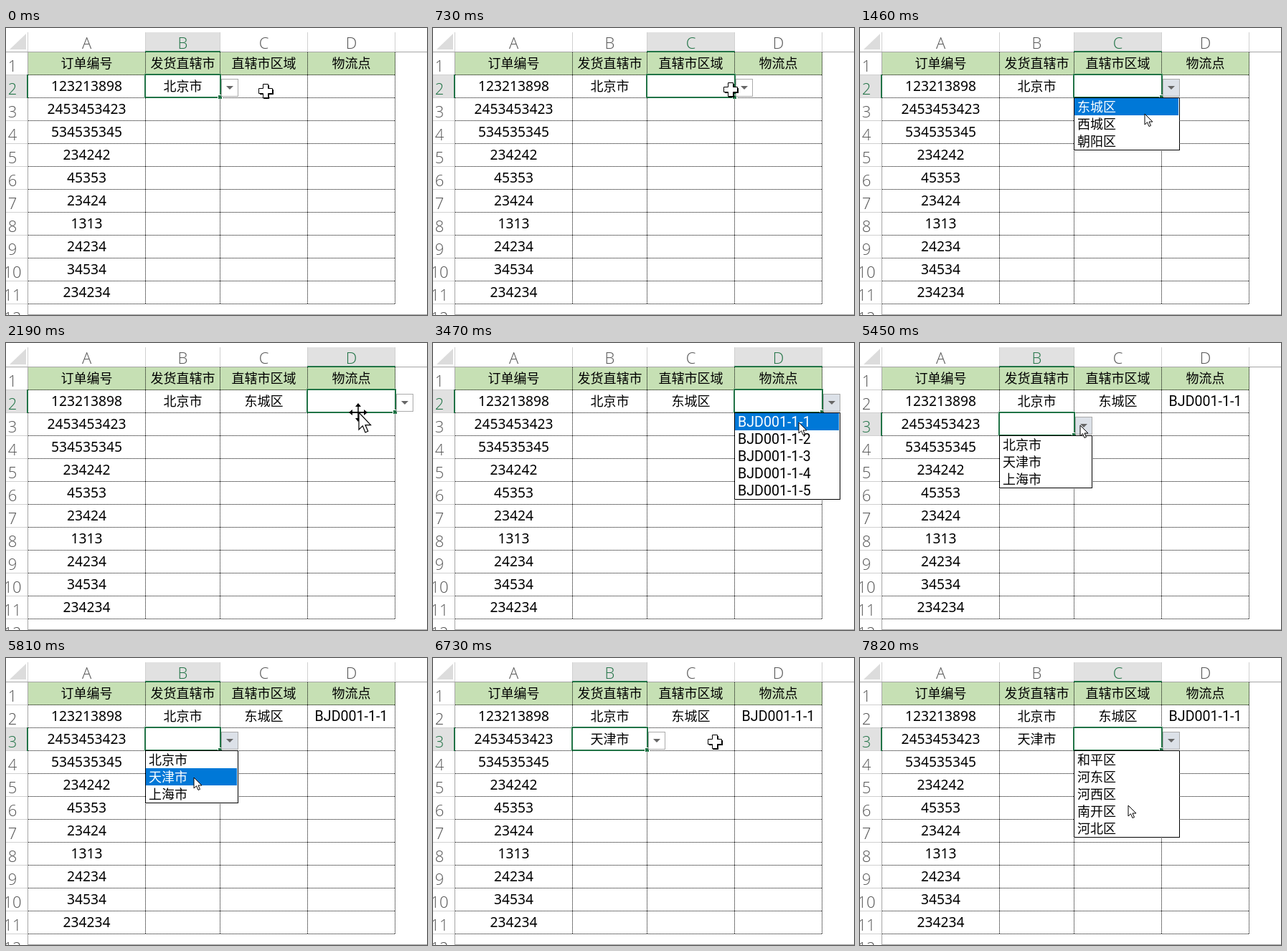
An HTML page for the animation above (8000 ms loop, 587 by 401 pixels).

```html
<!DOCTYPE html>
<html lang="zh-CN">
<head>
<meta charset="utf-8">
<style>
html, body { margin: 0; width: 100%; height: 100%; overflow: hidden; background: #fff; }
svg { display: block; width: 587px; height: 401px; }
text { font: 18px "Noto Sans CJK SC", "Noto Sans CJK", sans-serif; fill: #000; }
.num { font: 19.2px "Noto Sans", sans-serif; }
.code { font: 19.6px Roboto, sans-serif; }
.head { font: 300 22px "Open Sans", "Noto Sans", sans-serif; fill: #555; }
.head.on { fill: #217346; }
.mid { text-anchor: middle; }
</style>
</head>
<body>
<svg id="stage" viewBox="0 0 587 401" xmlns="http://www.w3.org/2000/svg"></svg>
<script>
const LOOP = 8000, STEPS = 44;
const GREEN = '#217346';
const colX = { A: 30, B: 194, C: 298, D: 420, E: 542 };
const cols = 'ABCD';
const rowY = r => 33 + 32 * (r - 1);
const right = c => colX[String.fromCharCode(c.charCodeAt(0) + 1)];
const center = c => (colX[c] + right(c)) / 2 + 0.5;

const titles = ['订单编号', '发货直辖市', '直辖市区域', '物流点'];
const orders = ['123213898', '2453453423', '534535345', '234242', '45353',
  '23424', '1313', '24234', '34534', '234234'];
const cities = ['北京市', '天津市', '上海市'];
const beijing = ['东城区', '西城区', '朝阳区'];
const tianjin = ['和平区', '河东区', '河西区', '南开区', '河北区'];
const points = [1, 2, 3, 4, 5].map(n => 'BJD001-1-' + n);

// Each entry starts at the given step and holds until the next one.
const selection = [[0, 'B2'], [2, 'C2'], [12, 'D2'], [26, 'B3'], [38, 'C3']];
const hover = [[0, 0], [5, 1], [10, 0], [16, 1], [22, 0], [29, 1], [34, 0], [40, 1]];
const menu = [[0, null], [6, beijing], [10, null], [17, points], [22, null],
  [30, cities], [34, null], [41, tianjin]];
const marked = [[0, -1], [8, 0], [10, -1], [18, 0], [22, -1], [31, 0], [32, 1], [34, -1]];
const shape = [[0, 'cross'], [5, 'arrow'], [11, 'cross'], [12, 'move'], [13, 'cross'],
  [14, 'arrow'], [22, 'cross'], [29, 'arrow'], [35, 'cross'], [40, 'arrow']];
const filled = [[0, 'B2', cities[0]], [10, 'C2', beijing[0]],
  [22, 'D2', points[0]], [34, 'B3', cities[1]]];
const path = [[0, 362, 88], [2, 372, 87], [5, 437, 85], [6, 437, 85], [8, 397, 120],
  [10, 397, 120], [12, 491, 97], [15, 554, 84], [17, 554, 84], [19, 510, 111],
  [21, 510, 111], [22, 490, 114], [24, 257, 116], [26, 257, 116], [30, 307, 115],
  [32, 262, 167], [34, 262, 167], [37, 393, 117], [40, 432, 113], [41, 432, 113],
  [43, 374, 206]];

const at = (track, k) => track.filter(e => e[0] <= k).pop()[1];

function pointer(k) {
  const i = path.findIndex(p => p[0] >= k);
  if (i < 1) return path[0].slice(1);
  const [a, b] = [path[i - 1], path[i]];
  const f = (k - a[0]) / (b[0] - a[0]);
  return [1, 2].map(n => Math.round(a[n] + (b[n] - a[n]) * f));
}

const rect = (x, y, w, h, fill, more = '') =>
  `<rect x="${x}" y="${y}" width="${w}" height="${h}" fill="${fill}" ${more}/>`;
const text = (s, x, y, cls = '', more = '') =>
  `<text x="${x}" y="${y}" class="${cls}" ${more}>${s}</text>`;
const line = (x1, y1, x2, y2, color, more = '') =>
  `<path d="M${x1} ${y1}L${x2} ${y2}" stroke="${color}" fill="none" ${more}/>`;
const kind = s => /^\d/.test(s) ? 'num' : /^[A-Z]/.test(s) ? 'code' : '';
const cellText = (c, r, s) => text(s, center(c), rowY(r) + (kind(s) ? 55 - 32 : 23), kind(s) + ' mid');
const colHead = (c, on = '') => text(c, center(c), 29, 'head mid ' + on);
const rowHead = (r, on = '') => text(r, 9, rowY(r) + 28, 'head mid ' + on);

function sheet() {
  let s = rect(0, 0, 587, 401, '#fff') + rect(31, 34, 512, 32, '#c6e0b4');
  s += '<path d="M28 8V30H5Z" fill="#dcdcdc"/>';
  for (const x of Object.values(colX)) s += line(x + .5, 6, x + .5, 33, '#d0d0d0');
  for (let r = 2; r <= 12; r++) {
    const y = rowY(r) + .5;
    s += line(0, y, 30, y, '#d0d0d0');
    s += line(31, y, 543, y, '#000', 'stroke-dasharray="1 1"');
  }
  for (const c of 'BCDE')
    s += line(colX[c] + .5, 34, colX[c] + .5, 386, '#000', 'stroke-dasharray="1 1"');
  s += line(0, 33.5, 587, 33.5, '#a6a6a6') + line(30.5, 33, 30.5, 401, '#a6a6a6');
  s += line(30, 400.5, 587, 400.5, '#a6a6a6');
  [...cols].forEach((c, i) => s += colHead(c) + cellText(c, 1, titles[i]));
  for (let r = 1; r <= 12; r++) s += rowHead(r);
  orders.forEach((n, i) => s += cellText('A', i + 2, n));
  return s;
}

function selected(cell, over) {
  const c = cell[0], r = +cell[1], x = colX[c], y = rowY(r), w = right(c) - x;
  return rect(x + 1, 6, w - 1, 26, '#e1e1e1') + rect(x, 32, w + 1, 2, GREEN) + colHead(c, 'on') +
    rect(0, y + 1, 29, 31, '#e1e1e1') + rect(29, y, 2, 33, GREEN) + rowHead(r, 'on') +
    rect(x, y, w + 1, 32, 'none', `stroke="${GREEN}" stroke-width="2"`) +
    rect(x + w - 3, y + 28, 7, 7, '#fff') + rect(x + w - 2, y + 29, 5, 5, GREEN) +
    rect(x + w + 2.5, y + 6.5, 23, 24, over ? '#dce1e8' : '#fff', 'stroke="#ababab"') +
    `<path d="M${x + w + 9} ${y + 16}h10l-5 5z" fill="#666"/>`;
}

function dropList(cell, items, mark) {
  const c = cell[0], x = colX[c], y = rowY(+cell[1]) + 32, w = right(c) - x + 26;
  let s = rect(x + .5, y + .5, w - 1, 24 * items.length + 1, '#fff', 'stroke="#000"');
  items.forEach((item, i) => {
    if (i === mark) s += rect(x + 1, y + 1 + 24 * i, w - 3, 24, '#0078d7');
    s += text(item, x + 5, y + 20 + 24 * i, kind(item), i === mark ? 'style="fill:#fff"' : '');
  });
  return s;
}

const arrowShape = 'M0 0V15L3.5 11.7L6 17.5L8.5 16.4L6 11H11Z';
const ink = 'fill="#fff" stroke="#000"';
const cursors = {
  arrow: `<path d="${arrowShape}" ${ink}/>`,
  cross: '<path d="M-3 -8H5V-2H11V5H5V11H-3V5H-8V-2H-3Z" fill="#000"/>' +
    `<path d="M-3.5 -9.5H3.5V-3.5H9.5V3.5H3.5V9.5H-3.5V3.5H-9.5V-3.5H-3.5Z" ${ink}/>`,
  move: '<path d="M-8 0H8M0 -8V8" stroke="#000" stroke-width="1.5"/>' +
    [0, 90, 180, 270].map(a => `<path d="M0 -13L4 -8H-4Z" transform="rotate(${a})"/>`).join('') +
    `<path d="${arrowShape}" transform="translate(1 0) scale(1.5 1.6)" ${ink} stroke-width=".8"/>`
};

function frame(k) {
  const cell = at(selection, k), items = at(menu, k), [x, y] = pointer(k);
  let s = '';
  for (const [from, id, value] of filled)
    if (k >= from) s += cellText(id[0], +id[1], value);
  s += selected(cell, at(hover, k));
  if (items) s += dropList(cell, items, at(marked, k));
  return s + `<g transform="translate(${x} ${y})">${cursors[at(shape, k)]}</g>`;
}

const stage = document.getElementById('stage');
stage.innerHTML = sheet() + '<g id="live"></g>';
const live = document.getElementById('live');
let shown = -1;

function draw(now) {
  const k = Math.floor(((now % LOOP) + 15) * STEPS / LOOP) % STEPS;
  if (k !== shown) live.innerHTML = frame(shown = k);
  requestAnimationFrame(draw);
}
draw(0);
</script>
</body>
</html>
```
